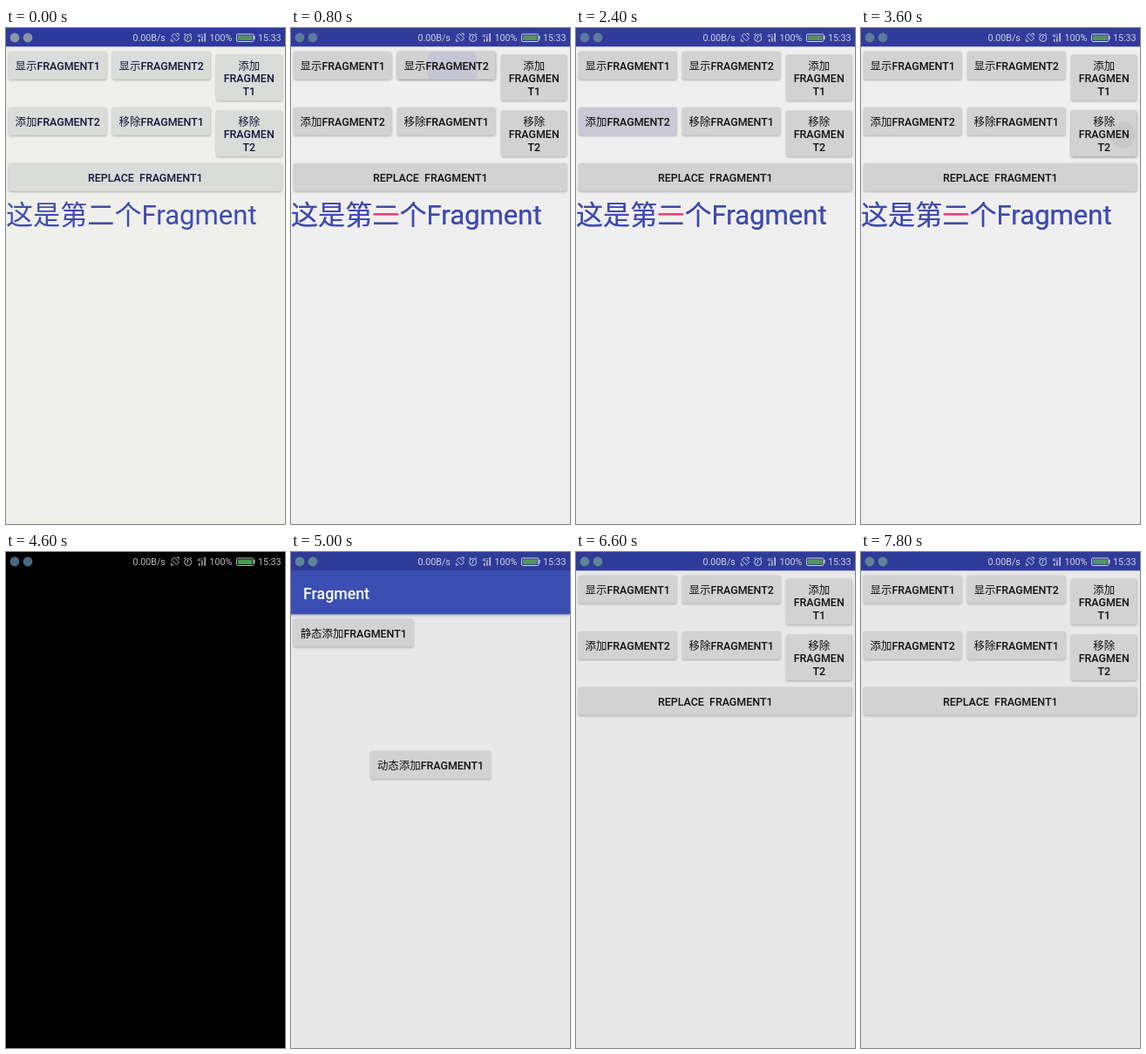
Recreate the animation shown at these times as an HTML page. Size 320x568 px, loop 8 s.

```html
<!DOCTYPE html>
<html lang="zh-CN">
<head>
<meta charset="utf-8">
<title>Fragment</title>
<style>
html, body { margin: 0; width: 100%; height: 100%; overflow: hidden; background: #000; }
svg { display: block; width: 320px; height: 568px; }
text { font-family: Roboto, "Noto Sans CJK SC", "Noto Sans CJK", sans-serif; white-space: pre; }
.button rect { fill: var(--button); filter: drop-shadow(0 1px .8px rgba(0,0,0,.28)); }
.button.pressed rect { filter: drop-shadow(0 1.6px 1.4px rgba(0,0,0,.42)); }
.button text { font-size: 12.44px; font-weight: 500; fill: var(--label); text-anchor: middle; }
.button .han { font-weight: 400; }
.big { font-size: 31.1px; fill: #3f4bb0; }
.status { font-size: 10.67px; }
</style>
</head>
<body>
<svg viewBox="0 0 320 568">
  <rect width="320" height="568" fill="var(--bg)"/>
  <g id="fragments">
    <g id="panel"></g>
    <g class="big">
      <text id="first" y="225">这是第<tspan fill="#ee3f7a">一</tspan>个Fragment</text>
      <text id="second" y="225">这是第二个Fragment</text>
    </g>
  </g>
  <g id="home">
    <rect y="20" width="320" height="51.3" fill="#3b4fb3" style="filter:drop-shadow(0 1.5px 1.5px rgba(0,0,0,.3))"/>
    <text x="14" y="54" font-size="17.78" font-weight="500" fill="#fff">Fragment</text>
  </g>
  <rect width="320" height="21.33" fill="var(--bar)"/>
  <g fill="var(--dot)"><circle cx="10" cy="11" r="5.4"/><circle cx="25" cy="11" r="5.4"/></g>
  <g class="status" fill="var(--ink)">
    <text x="145.5" y="15.3">0.00B/s</text>
    <text x="233.5" y="15.3">100%</text>
    <text x="289" y="15.3">15:33</text>
    <text x="219" y="10.8" font-size="6" style="font-size:6px">4G</text>
    <path d="M221 15.8v-3h1.4v3zM224.2 15.8v-4.5h1.4v4.5zM227.4 15.8v-9.8h1.5v9.8z"/>
    <rect x="284" y="9" width="1.5" height="4"/>
  </g>
  <g fill="none" stroke="var(--ink)">
    <path d="M190 9.3l3-3 5.5 5.5-3 3zM195.5 6.3h2.6v2.4M189.4 12.5v2.6h2.6"/>
    <circle cx="208.7" cy="11.5" r="4"/>
    <path d="M208.7 9v2.7l-1.7 1.5M204.2 8l2-2M213.2 8l-2-2"/>
    <rect x="264.5" y="7" width="19.5" height="8.5" rx="1.3"/>
  </g>
  <rect x="266" y="8.5" width="16.5" height="5.5" fill="var(--battery)"/>
</svg>
<script>
const LOOP = 8000;
const byId = id => document.getElementById(id);
const svgNode = document.querySelector('svg');
const panel = byId('panel'), home = byId('home');

function addButton(parent, id, x, y, w, h, lines) {
  const texts = lines.map((line, i) => {
    const label = line.replace(/[\u4e00-\u9fff]+/, '<tspan class="han">$&</tspan>');
    const baseline = y + h / 2 + 5.4 + (i - (lines.length - 1) / 2) * 14.5;
    return `<text x="${x + w / 2}" y="${baseline}">${label}</text>`;
  }).join('');
  parent.insertAdjacentHTML('beforeend', `<g class="button" id="${id}">
    <clipPath id="${id}-clip"><path d="M${x} ${y}h${w}v${h}h${-w}z"/></clipPath>
    <rect x="${x}" y="${y}" width="${w}" height="${h}" rx="2"/>
    <circle clip-path="url(#${id}-clip)" r="0"/>${texts}</g>`);
}

addButton(panel, 'show1', 3, 26.7, 112.5, 32, ['显示FRAGMENT1']);
addButton(panel, 'show2', 122, 26.7, 112.5, 32, ['显示FRAGMENT2']);
addButton(panel, 'add1', 241, 30.5, 75.5, 52.6, ['添加', 'FRAGMEN', 'T1']);
addButton(panel, 'add2', 3, 90.7, 112.5, 32, ['添加FRAGMENT2']);
addButton(panel, 'remove1', 122, 90.7, 112.5, 32, ['移除FRAGMENT1']);
addButton(panel, 'remove2', 241, 94.5, 75.5, 52.6, ['移除', 'FRAGMEN', 'T2']);
addButton(panel, 'replace', 3, 154.7, 313.5, 32, ['REPLACE\u00a0\u00a0FRAGMENT1']);
addButton(home, 'static', 3, 76.5, 137.5, 32, ['静态添加FRAGMENT1']);
addButton(home, 'dynamic', 91, 227.7, 138, 32, ['动态添加FRAGMENT1']);

const presses = [
  { id: 'show2', x: 185, y: 44, start: 700, color: '#b9b9d6' },
  { id: 'add2', x: 59, y: 107, start: 2050, color: '#c2c0d8' },
  { id: 'remove2', x: 300, y: 122, start: 3550, color: '#c0c0c0' },
  { id: 'dynamic', x: 160, y: 244, start: 5790, color: '#c8c8c8' }
];

const plain = {
  bg: '#efefef', button: '#d2d2d2', label: '#101010', bar: '#303b9c',
  ink: '#d0d3e2', dot: '#5c7a9c', battery: '#55965a'
};
const palettes = {
  plain,
  warm: { ...plain, bg: '#efefeb', button: '#dadcda', label: '#14143a', bar: '#2d399c', dot: '#8a94a8' },
  black: { ...plain, bg: '#000', bar: '#000', ink: '#bcbcbc', dot: '#48697f', battery: '#43a047' },
  grey: { ...plain, bg: '#e8e8e8', bar: '#2f3b98', dot: '#5f8497' }
};

// Each scene lasts until its end time.
const scenes = [
  { end: 400, palette: 'warm', view: 'panel', second: true },
  { end: 4400, palette: 'plain', view: 'panel', first: true, second: true },
  { end: 4800, palette: 'black' },
  { end: 6200, palette: 'grey', view: 'home' },
  { end: LOOP, palette: 'grey', view: 'panel' }
];

const show = (node, visible) => { node.style.display = visible ? '' : 'none'; };

function drawPress({ id, x, y, start, color }, time) {
  const age = time - start;
  const active = age >= 0 && age < 400;
  const ripple = byId(id).querySelector('circle');
  byId(id).classList.toggle('pressed', active && age < 300);
  ripple.setAttribute('cx', x);
  ripple.setAttribute('cy', y);
  ripple.setAttribute('r', active ? age * .3 : 0);
  ripple.setAttribute('fill', color);
  ripple.setAttribute('opacity', .5);
}

function draw(now) {
  const time = Math.floor(now % LOOP / 200) * 200;
  const scene = scenes.find(s => time < s.end);
  for (const [name, color] of Object.entries(palettes[scene.palette]))
    svgNode.style.setProperty('--' + name, color);
  show(byId('fragments'), scene.view === 'panel');
  show(home, scene.view === 'home');
  show(byId('first'), scene.first);
  show(byId('second'), scene.second);
  presses.forEach(press => drawPress(press, time));
}

const origin = performance.now();
function tick() {
  draw(performance.now() - origin);
  requestAnimationFrame(tick);
}
tick();
</script>
</body>
</html>
```
